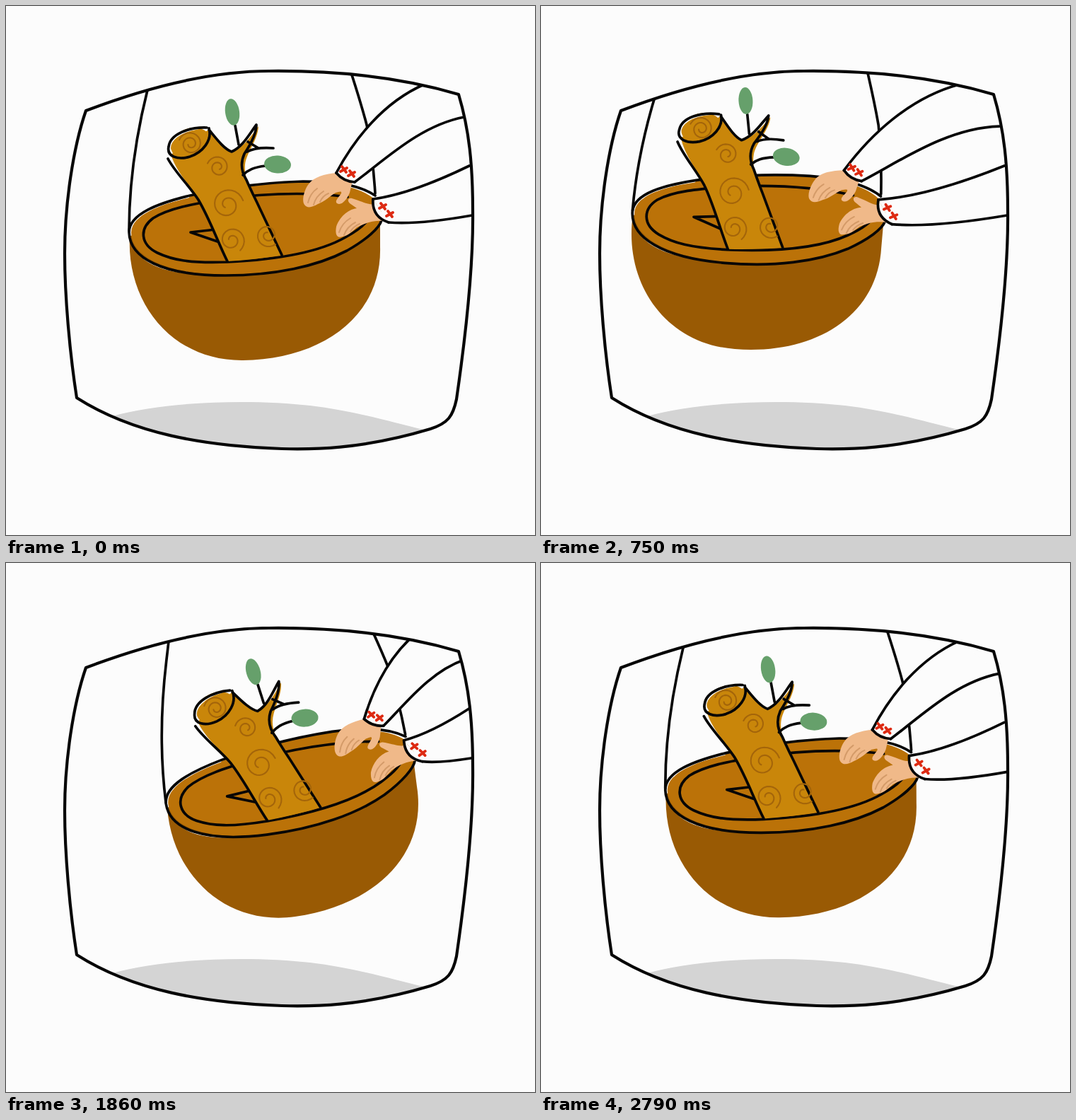
An HTML page for the animation above (2.82 s loop, 748 by 748 pixels).

```html
<!DOCTYPE html>
<html lang="en">
<head>
<meta charset="utf-8">
<title>Swinging bowl</title>
<style>
  html, body { margin: 0; width: 100%; height: 100%; overflow: hidden; background: #fcfcfc; }
  svg { display: block; width: 100%; height: 100%; }
  path, ellipse { fill: none; stroke-linecap: round; stroke-linejoin: round; }
  .ink { stroke: #060606; stroke-width: 3.7; }
  .paper { fill: #fcfcfc; }
  .gap { stroke: #fcfcfc; stroke-width: 2.4; }
  .shadow { fill: #d4d4d4; }
  .body { fill: #995a04; }
  .rim { fill: #bb7208; }
  .wood { fill: #c9860a; }
  .grain { stroke: #a4650a; stroke-width: 2.1; }
  .leaf { fill: #66a06b; }
  .skin { fill: #f0b989; }
  .crease { stroke: #d49b69; stroke-width: 2; }
  .stitch { stroke: #dd2a12; stroke-width: 3.8; }
</style>
</head>
<body>
<svg viewBox="0 0 748 748">
  <defs>
    <path id="outline" d="M113 148C200 115 290 92 372 92C470 91 560 101 640 125C655 175 660 225 660 290C661 370 648 480 637 556C632 580 625 590 600 598C500 628 430 627 390 626C280 622 180 605 100 554C90 490 83 410 83 350C83 280 95 200 113 148Z"/>
    <clipPath id="window"><use href="#outline"/></clipPath>
  </defs>

  <g clip-path="url(#window)">
    <path class="shadow" d="M150 580C230 558 350 556 430 565C490 572 545 588 590 599L390 670Z"/>

    <g class="swing">
      <!-- bowl -->
      <path class="body" d="M175 325C170 420 235 502 335 501C445 500 532 440 529 340V290Z"/>
      <path class="rim" d="M177 320C178 294 220 281 262 269C330 252 380 249 425 249C480 249 528 264 531 291C533 317 495 342 455 358C405 376 345 381 300 380C240 378 177 360 177 320Z"/>
      <path class="gap" d="M190 352C204 367 227 374 255 377M186 300C198 285 225 278 258 270"/>
      <path class="ink" d="M522 268C495 250 455 248 420 248C350 250 300 259 260 268C215 279 174 294 174 320C175 356 220 381 310 381C380 381 440 368 482 346C510 330 528 314 531 303"/>
      <path class="ink" d="M313 362C260 364 235 359 214 349C190 337 188 315 208 300C230 286 265 280 300 274C370 264 430 263 483 270M313 362C400 358 450 344 480 327C500 316 512 306 516 295"/>
      <path class="ink" d="M212 70Q206 95 200 119C184 183 174 250 174 318M480 70Q500 130 510 168Q519 215 522 265"/>
      <path class="ink" d="M296 316L261 320L299 333"/>

      <!-- log -->
      <path class="wood" d="M233 210L288 174C297 188 306 200 318 206C337 200 346 184 357 170C356 190 340 207 338 224C336 244 346 256 355 275L392 352Q350 359 313 361C299 333 289 303 273 274C260 254 241 235 233 210Z"/>
      <ellipse class="wood" cx="261" cy="194" rx="29" ry="21" transform="rotate(-18 261 194)"/>
      <path class="gap" d="M232 205C229 190 246 177 272 173"/>
      <path class="ink" d="M287 173C292 190 278 207 260 213C243 218 227 213 230 199C232 181 259 171 284 172M229 216C239 235 259 254 272 274C289 303 299 333 313 361M287 175C297 187 308 202 319 206C335 199 344 181 354 168C354 183 343 200 337 209C332 220 332 233 340 246Q347 262 355 278L390 352"/>
      <path class="ink" d="M329 196L324 169M342 192L357 201M341 206C350 201 364 200 378 201M367 226C350 228 342 232 335 239"/>
      <ellipse class="leaf" cx="320" cy="150" rx="10" ry="19" transform="rotate(-8 320 150)"/>
      <ellipse class="leaf" cx="384" cy="224" rx="19" ry="12.5" transform="rotate(4 384 224)"/>
      <path class="grain" id="grain"/>

      <!-- hands -->
      <path class="skin" d="M466 236C451 238 435 241 427 253C421 262 418 276 422 281C426 287 434 284 441 280C450 277 459 268 466 264C471 263 475 261 474 265C471 270 464 276 468 279C474 283 482 274 486 264L490 247Z"/>
      <path class="skin" d="M522 280C511 282 504 276 489 272C484 271 482 275 486 279L496 286C482 288 471 300 467 312C465 323 468 329 476 326C484 325 490 318 496 313C508 307 518 303 534 304Z"/>
      <path class="crease" d="M427 278Q430 265 440 258M435 281Q438 269 449 262M444 277Q448 268 456 265M471 320Q475 307 487 300M478 324Q482 312 494 306M487 319Q491 312 500 308"/>
    </g>

    <g id="sleeves"></g>

    <g class="swing">
      <path class="paper ink" d="M467 236Q477 248 493 249M519 273Q517 298 541 306"/>
      <path class="stitch" id="stitches"/>
    </g>
  </g>
  <use href="#outline" stroke="#060606" stroke-width="4.2"/>
</svg>

<script>
const LOOP = 2820, STEP = 30;
const ANCHOR = { x: 313, y: 360 };

// Time and sideways offset; the last swing is cut short by the loop.
const KEYS = [[0, 0], [950, -55], [2015, 63], [2880, 0]];

// Sleeve edges run from a cuff corner to the window's edge. The bows are
// relative to the length; sag lowers the end when the bowl swings left.
const ARMS = [
  [{ cuff: [467, 236], end: [591, 111], bows: [0.09, 0.13], sag: 0 },
   { cuff: [493, 249], end: [648, 157], bows: [0.03, 0.12], sag: 0.27 }],
  [{ cuff: [519, 273], end: [655, 226], bows: [-0.06, -0.04], sag: 0 },
   { cuff: [541, 306], end: [659, 296], bows: [-0.05, -0.03], sag: 0 }]
];
const LIFT = 0.36;

const swings = document.querySelectorAll('.swing');
const sleeves = document.getElementById('sleeves');
const mix = (a, b, k) => a + (b - a) * k;
const smooth = p => p * p * (3 - 2 * p);

// A curl that tightens from its outer end; a negative turn runs anticlockwise.
function curl(x, y, radius, startDegrees, turns) {
  const count = 40;
  const points = Array.from({ length: count + 1 }, (_, i) => {
    const p = i / count;
    const angle = startDegrees * Math.PI / 180 + p * turns * 2 * Math.PI;
    const r = radius * mix(1, 0.22, p);
    return [x + r * Math.cos(angle), y + r * Math.sin(angle)].map(v => v.toFixed(1));
  });
  return 'M' + points.join('L');
}

const cross = (x, y) => `M${x - 3} ${y - 4}l6 8m-8 -1l9 -5`;

function addPath(className) {
  const path = document.createElementNS('http://www.w3.org/2000/svg', 'path');
  path.setAttribute('class', className);
  return sleeves.appendChild(path);
}

document.getElementById('grain').setAttribute('d', [
  curl(261, 195, 17, 200, 1.9),
  curl(300, 228, 16, 200, 1.6),
  curl(313, 281, 23, -15, -1.6),
  curl(319, 331, 19, 50, -1.6),
  curl(370, 324, 17, 50, 1.6)
].join(''));
document.getElementById('stitches').setAttribute('d',
  cross(478, 231) + cross(489, 237) + cross(533, 283) + cross(543, 294));
const sleevePaths = ARMS.map(() => ({ fill: addPath('paper'), line: addPath('ink') }));

function offsetAt(t) {
  const i = KEYS.findIndex(([time]) => time > t);
  const [t0, u0] = KEYS[i - 1], [t1, u1] = KEYS[i];
  return mix(u0, u1, smooth((t - t0) / (t1 - t0)));
}

function edgePoints({ cuff, end, bows, sag }, u, toStage) {
  const [x, y] = toStage(cuff);
  const dx = end[0] - x;
  const dy = end[1] - y - (u > 0 ? LIFT : sag) * u;
  const at = (along, bow) => [x + dx * along + dy * bow, y + dy * along - dx * bow];
  return [at(0, 0), at(0.3, bows[0]), at(0.67, bows[1]), at(1, 0)];
}

function draw(t) {
  const u = offsetAt(t);
  const x = ANCHOR.x + u;
  const y = ANCHOR.y + 0.2155 * u - 0.00289 * u * u;
  const angle = -0.1143 * u - 0.000255 * u * u;
  for (const g of swings) {
    g.setAttribute('transform', `translate(${x} ${y}) rotate(${angle}) translate(${-ANCHOR.x} ${-ANCHOR.y})`);
  }

  const cos = Math.cos(angle * Math.PI / 180), sin = Math.sin(angle * Math.PI / 180);
  const toStage = ([px, py]) => {
    const dx = px - ANCHOR.x, dy = py - ANCHOR.y;
    return [x + dx * cos - dy * sin, y + dx * sin + dy * cos];
  };
  ARMS.forEach((edges, i) => {
    const [upper, lower] = edges.map(edge => edgePoints(edge, u, toStage));
    const curve = ([a, b, c, d]) => `${a}C${b} ${c} ${d}`;
    sleevePaths[i].fill.setAttribute('d', `M${curve(upper)}L${curve(lower.slice().reverse())}Z`);
    sleevePaths[i].line.setAttribute('d', `M${curve(upper)}M${curve(lower)}`);
  });
}

function frame(now) {
  const t = Math.floor((now % LOOP) / STEP) * STEP;
  draw(t < 2 * STEP ? 0 : t);
  requestAnimationFrame(frame);
}
draw(0);
requestAnimationFrame(frame);
</script>
</body>
</html>
```
